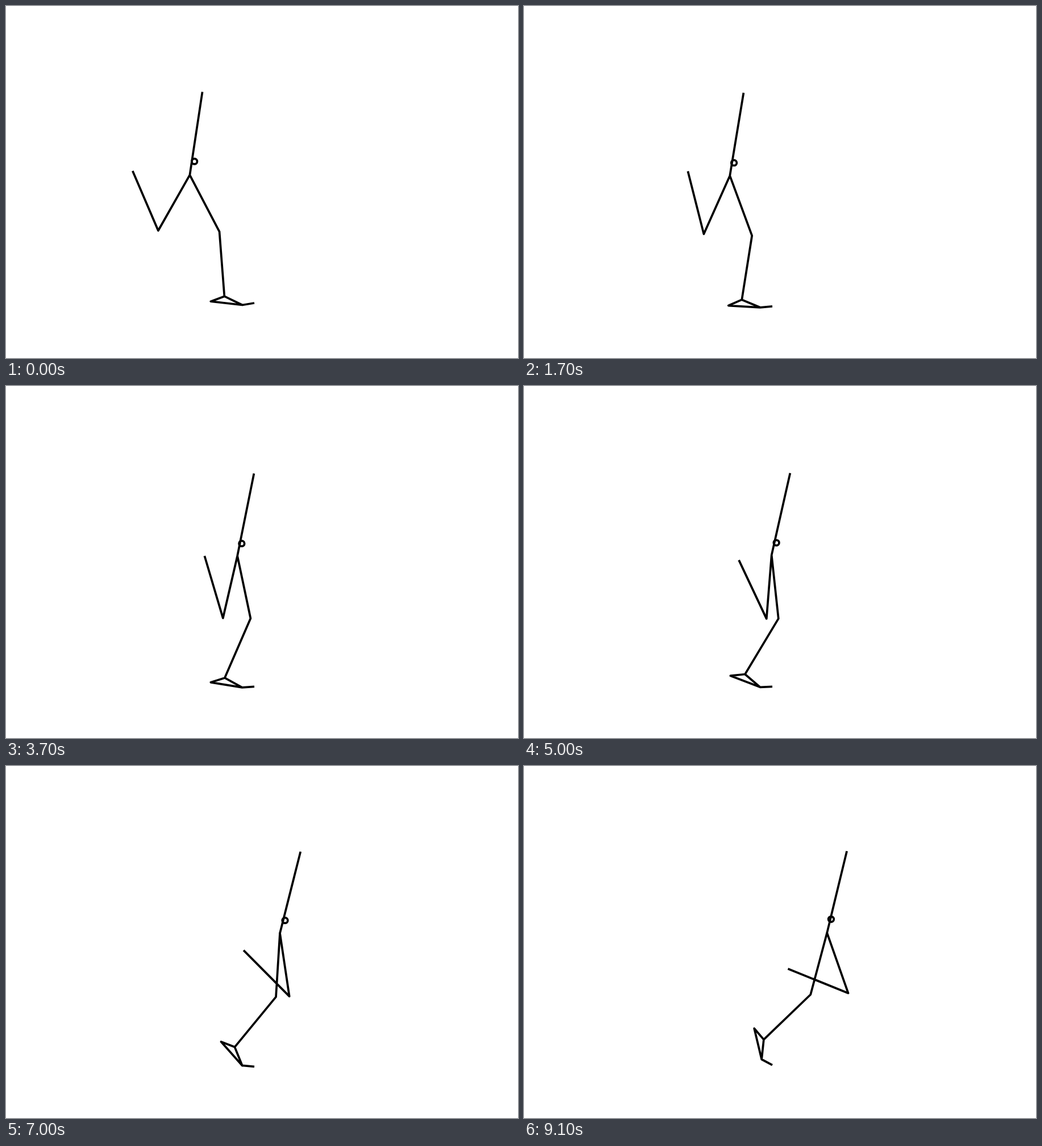
Recreate the animation shown at these times as an HTML page. Size 901 by 621 pixels, loop 9.2 s.

```html
<!DOCTYPE html>
<html lang="en">
<head>
<meta charset="utf-8">
<title>Walking stick figure</title>
<style>
  html, body { margin: 0; width: 100%; height: 100%; overflow: hidden; background: #fff; }
  svg { display: block; width: 901px; height: 621px; }
  path, circle { fill: none; stroke: #000; stroke-width: 3.75; stroke-linejoin: round; }
</style>
</head>
<body>
<svg viewBox="0 0 901 621">
  <path id="body"/>
  <circle id="mass" r="4.8"/>
</svg>
<script>
const LOOP = 9200, STEP = 100;

// Segment lengths
const TORSO = 148.3, THIGH = 112.7, SHANK = 114.4, SOLE = 56, INSTEP = 35.1, TOE = 21.4;
const ARCH = 19.5; // angle between sole and instep

// Polynomial in u, lowest power first.
const poly = (u, ...c) => c.reduceRight((sum, k) => sum * u + k, 0);

// Point at a distance from p; 0 degrees is straight down, positive is forward.
function reach([x, y], len, deg) {
  const a = deg * Math.PI / 180;
  return [x + len * Math.sin(a), y + len * Math.cos(a)];
}

// Joint angles in degrees while the walk goes from u = 0 to 1.
function angles(u) {
  return {
    toe: 33 * u ** 4.6 - 4.6 - 4.8 * Math.exp(-u / 0.07),
    foot: poly(u, 6.44, -23.02, -11.94, 285.1, -180),
    shank: poly(u, 4.4, -69.46, -27.05, 91.05, -45),
    thigh: poly(u, 27.56, -41.95, 19.28, -31.79, 12),
    lean: poly(u, 8.59, 0.56, 22.72, -18.27),
    swingThigh: poly(u, -29.52, 16.63, 77.19, -45),
    swingShank: poly(u, 23.2, -65.46, 43.71, 332.29, -415.8, 150)
  };
}

// The planted toe carries the leg, the leg carries everything else.
function pose(u) {
  const a = angles(u);
  const tip = [437, 530.4 - 6.4 * Math.exp(-u / 0.07) - 2.7 * u ** 16];
  const ball = reach(tip, TOE, -90 - a.toe);
  const heel = reach(ball, SOLE, -90 - a.foot);
  const ankle = reach(ball, INSTEP, -90 - a.foot - ARCH);
  const knee = reach(ankle, -SHANK, a.shank);
  const hip = reach(knee, -THIGH, a.thigh);
  const head = reach(hip, TORSO, 180 - a.lean);
  const swingKnee = reach(hip, THIGH, a.swingThigh);
  const swingFoot = reach(swingKnee, SHANK, 180 + a.swingShank);
  const mass = [
    hip[0] + 8.2 - Math.sin(2 * Math.PI * u) - u ** 6,
    hip[1] - 24 + 2.3 * Math.sin(Math.PI * u)
  ];
  return { tip, ball, heel, ankle, knee, hip, head, swingKnee, swingFoot, mass };
}

const line = (...pts) => "M" + pts.map(p => p.map(n => n.toFixed(2)).join(" ")).join("L");
const body = document.getElementById("body");
const mass = document.getElementById("mass");

function draw(u) {
  const p = pose(u);
  body.setAttribute("d",
    line(p.head, p.hip, p.swingKnee, p.swingFoot) +
    line(p.hip, p.knee, p.ankle) +
    line(p.ankle, p.heel, p.ball) + "Z" +
    line(p.ball, p.tip));
  mass.setAttribute("cx", p.mass[0]);
  mass.setAttribute("cy", p.mass[1]);
}

const start = performance.now();
function tick() {
  const t = (performance.now() - start) % LOOP;
  draw(Math.floor(t / STEP) * STEP / (LOOP - STEP));
  requestAnimationFrame(tick);
}
tick();
</script>
</body>
</html>
```
